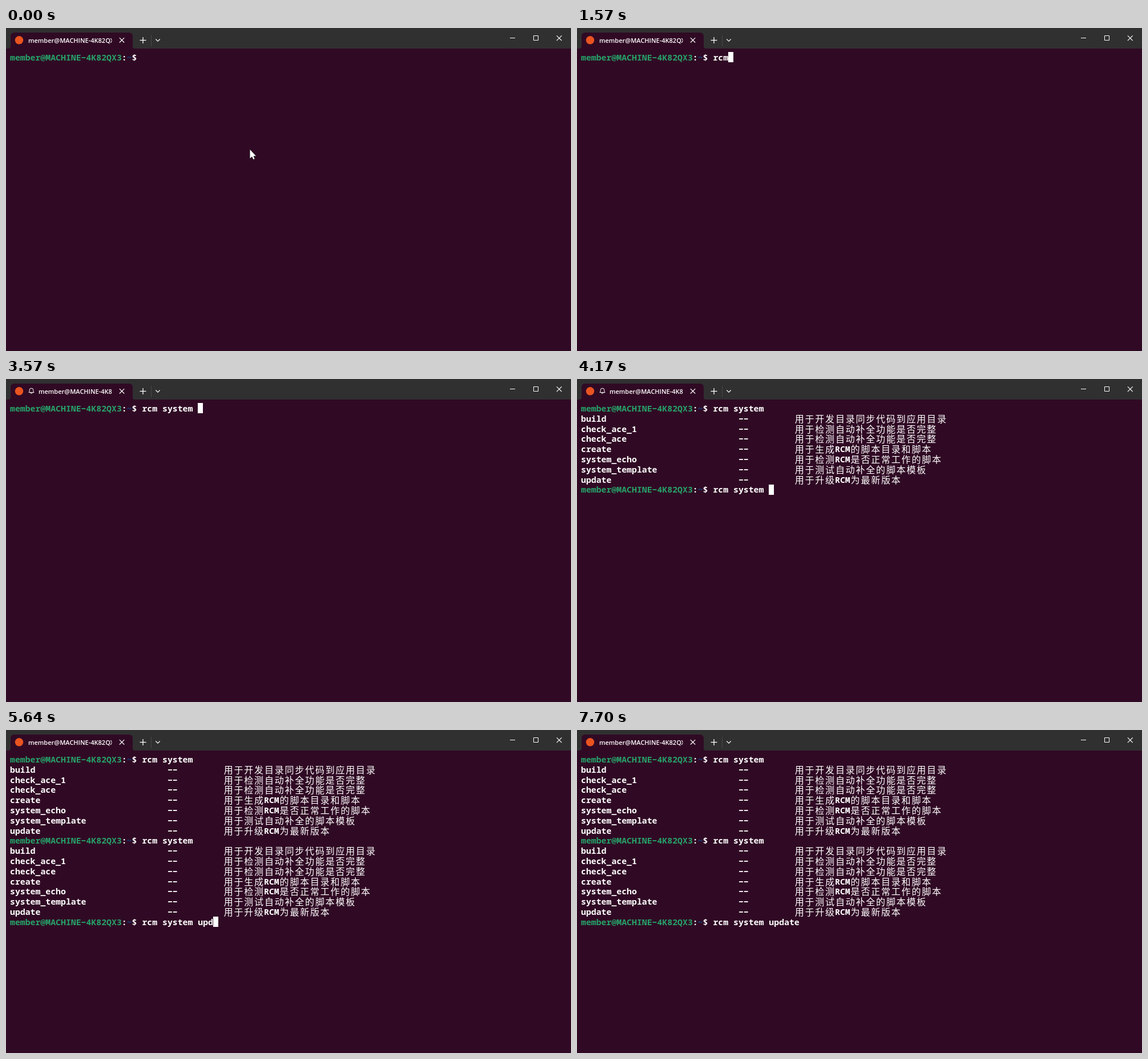
Animation, 990 px wide and 566 px high, one loop 8000 ms. Source, as an HTML page with a canvas:

```html
<!DOCTYPE html>
<html lang="zh">
<head>
<meta charset="utf-8">
<title>Terminal</title>
<style>
html, body { margin: 0; height: 100%; overflow: hidden; background: #300a24; }
canvas { display: block; }
</style>
</head>
<body>
<canvas id="stage" width="990" height="566"></canvas>
<script>
const ctx = document.getElementById('stage').getContext('2d');
const LOOP = 8000, CELL = 8.9, ROW = 17.8, LEFT = 7, TOP = 42.6;
const BG = '#300a24', WHITE = '#fff';
const MONO = '600 14.83px "Noto Sans Mono", "DejaVu Sans Mono", monospace';
const WIDE = '400 16px "Noto Sans CJK SC", "Noto Sans CJK", sans-serif';
const USER = 'member@MACHINE-4K82QX3';

const commands = [
  ['build', '用于开发目录同步代码到应用目录'],
  ['check_ace_1', '用于检测自动补全功能是否完整'],
  ['check_ace', '用于检测自动补全功能是否完整'],
  ['create', '用于生成RCM的脚本目录和脚本'],
  ['system_echo', '用于检测RCM是否正常工作的脚本'],
  ['system_template', '用于测试自动补全的脚本模板'],
  ['update', '用于升级RCM为最新版本'],
];

// Time in ms and length of the typed line from then on
const LINE = 'rcm system update';
const keys = [[0, 0], [1170, 1], [1440, 2], [1570, 3], [1770, 4], [2770, 5], [3370, 11],
  [5440, 12], [5570, 13], [5640, 14], [5700, 15], [5840, 16], [5970, 17]];
const cursorFlips = [500, 1100, 1170, 2370, 2770, 4900, 5440, 6570, 7170, 7700];

const between = (t, a, b) => t >= a && t < b;

function stroke(points, color = WHITE, width = 1, close = false) {
  ctx.beginPath();
  points.forEach(([x, y]) => ctx.lineTo(x, y));
  if (close) ctx.closePath();
  ctx.strokeStyle = color;
  ctx.lineWidth = width;
  ctx.stroke();
}

function cross(x, y, r) {
  stroke([[x - r, y - r], [x + r, y + r]], WHITE, 1.2);
  stroke([[x + r, y - r], [x - r, y + r]], WHITE, 1.2);
}

// Writes on the character grid; Chinese characters take two cells
function write(text, col, row, color = WHITE) {
  const y = Math.round(57 + row * ROW);
  ctx.fillStyle = color;
  for (const ch of text) {
    const wide = ch > '\u2fff';
    ctx.font = wide ? WIDE : MONO;
    ctx.fillText(ch === '-' ? '\u2212' : ch, LEFT + col * CELL + (wide ? 0.9 : 0), y + (wide ? 1 : 0));
    col += wide ? 2 : 1;
  }
}

function prompt(row, text) {
  write(USER, 0, row, '#26a269');
  write(':', 22, row);
  write('~', 23, row, '#12488b');
  write('$ ' + text, 24, row);
}

function bell() {
  ctx.beginPath();
  ctx.moveTo(40, 23.5);
  ctx.lineTo(41.2, 21.5);
  ctx.lineTo(41.2, 19.5);
  ctx.arc(44.5, 19.5, 3.3, Math.PI, 0);
  ctx.lineTo(47.8, 21.5);
  ctx.lineTo(49, 23.5);
  ctx.closePath();
  ctx.moveTo(46, 24);
  ctx.arc(44.5, 24, 1.5, 0, Math.PI);
  ctx.strokeStyle = WHITE;
  ctx.lineWidth = 1;
  ctx.stroke();
}

function titleBar(ringing) {
  ctx.fillStyle = '#303030';
  ctx.fillRect(0, 0, 990, 36);

  ctx.fillStyle = BG;
  ctx.beginPath();
  ctx.moveTo(4, 36);
  ctx.quadraticCurveTo(8, 36, 8, 32);
  ctx.lineTo(8, 15);
  ctx.quadraticCurveTo(8, 8, 15, 8);
  ctx.lineTo(215, 8);
  ctx.quadraticCurveTo(222, 8, 222, 15);
  ctx.lineTo(222, 32);
  ctx.quadraticCurveTo(222, 36, 226, 36);
  ctx.fill();

  ctx.fillStyle = '#e95420';
  ctx.beginPath();
  ctx.arc(23, 21.3, 7.2, 0, 7);
  ctx.fill();

  if (ringing) bell();
  ctx.save();
  ctx.beginPath();
  ctx.rect(39, 8, 146.5, 28);
  ctx.clip();
  ctx.font = '600 11px "Open Sans", "Noto Sans", sans-serif';
  ctx.fillStyle = WHITE;
  ctx.fillText(USER + ': ~', ringing ? 57 : 39, 26);
  ctx.restore();

  cross(203, 21.3, 4.2);
  stroke([[234.5, 21.5], [245.5, 21.5]], WHITE, 1.3);
  stroke([[240, 16], [240, 27]], WHITE, 1.3);
  stroke([[254.5, 12], [254.5, 32]], '#484848');
  stroke([[262.3, 19.5], [266, 23.2], [269.7, 19.5]], WHITE, 1.1);
  stroke([[883, 17.5], [892, 17.5]]);
  stroke([[924.5, 13.5], [932.5, 13.5], [932.5, 21.5], [924.5, 21.5]], WHITE, 1, true);
  cross(969.3, 17.8, 4.4);
}

function pointer() {
  const shape = [[427.5, 213], [427.5, 228.5], [431, 225.3], [433.4, 230.3],
    [435.8, 229.2], [433.4, 224.4], [438, 224.2]];
  stroke(shape, '#000', 1, true);
  ctx.fillStyle = WHITE;
  ctx.fill();
}

function draw(t) {
  ctx.fillStyle = BG;
  ctx.fillRect(0, 0, 990, 566);
  titleBar(between(t, 3570, 5370));

  const lists = (t >= 4170) + (t >= 4300);
  for (let i = 0; i < lists; i++) {
    prompt(i * 8, 'rcm system');
    commands.forEach(([name, note], n) => {
      const row = i * 8 + n + 1;
      write(name, 0, row);
      write('--', 31, row);
      write(note, 42, row);
    });
  }

  const row = lists * 8;
  const typed = keys.filter(k => k[0] <= t).pop()[1];
  prompt(row, LINE.slice(0, typed));

  if (cursorFlips.filter(f => f <= t).length % 2) {
    ctx.fillStyle = WHITE;
    ctx.fillRect(Math.round(LEFT + (26 + typed) * CELL), Math.round(TOP + row * ROW - 0.2), 9, 18);
  }
  if (t < 1240 || between(t, 2040, 2840)) pointer();
}

const start = performance.now();
function tick() {
  draw((performance.now() - start) % LOOP);
  requestAnimationFrame(tick);
}
tick();
</script>
</body>
</html>
```
